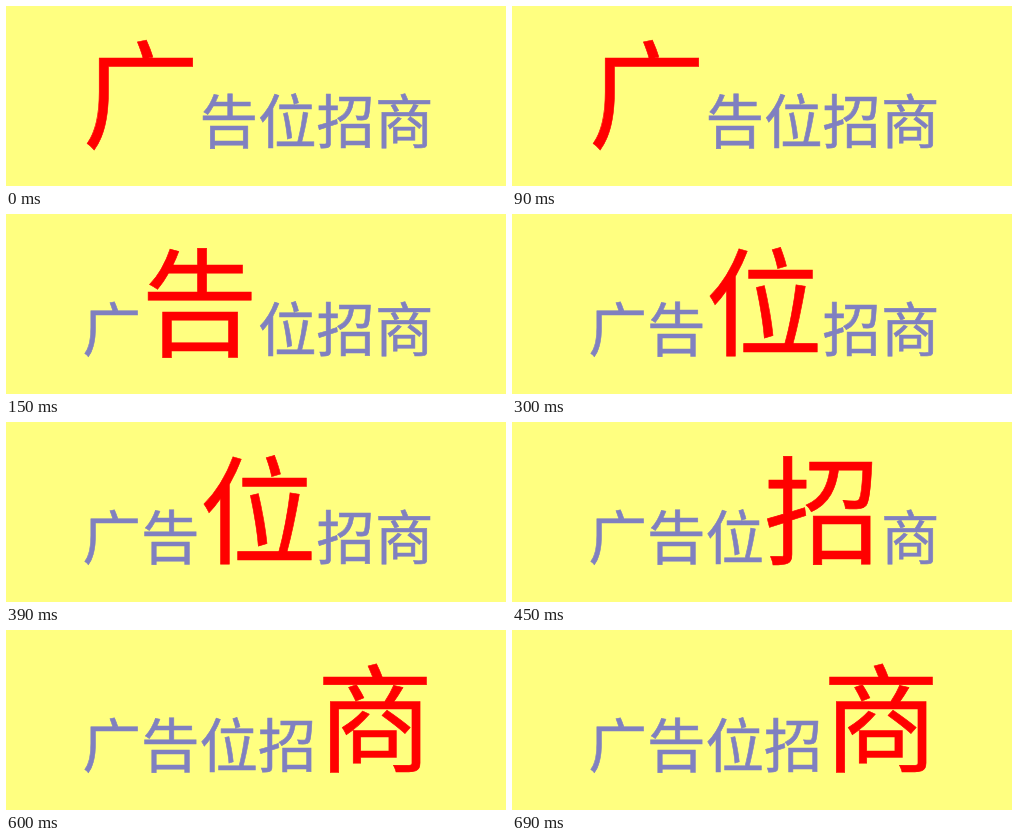
These frames come from a looping animation (500 by 180 pixels, 750 ms). An HTML page:

```html
<!DOCTYPE html>
<html lang="zh-CN">
<head>
<meta charset="utf-8">
<title>广告位招商</title>
<style>
html, body {
  margin: 0;
  width: 100%;
  height: 100%;
  overflow: hidden;
  background: #ffff80;
}
.banner {
  position: absolute;
  left: 2px;
  top: 0;
  width: 500px;
  height: 141px;
  display: flex;
  justify-content: center;
  align-items: flex-end;
  font-family: "Noto Sans CJK SC", "Noto Sans CJK", sans-serif;
  line-height: 1;
  white-space: nowrap;
}
.banner span {
  font-size: 58.5px;
  color: #8080c0;
  -webkit-text-stroke: .6px currentColor;
  animation: grow .75s step-end infinite;
  animation-delay: calc(var(--i) * .15s - .75s);
}
@keyframes grow {
  0% { font-size: 117px; color: #f00; }
  20%, 100% { font-size: 58.5px; color: #8080c0; }
}
</style>
</head>
<body>
<div class="banner">
  <span style="--i:0">广</span>
  <span style="--i:1">告</span>
  <span style="--i:2">位</span>
  <span style="--i:3">招</span>
  <span style="--i:4">商</span>
</div>
</body>
</html>
```
